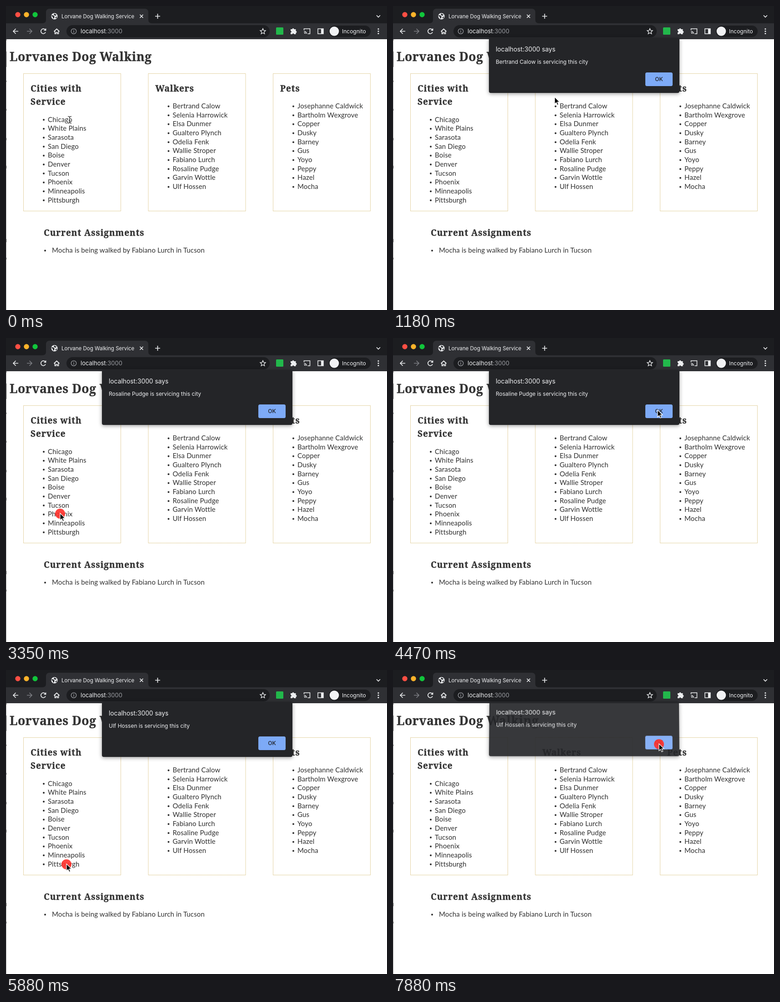
These frames come from a looping animation (838 by 668 pixels, 8 s). An HTML page:

```html
<!DOCTYPE html>
<html lang="en">
<head>
<meta charset="utf-8">
<title>Dog walking service</title>
<style>
html, body { margin: 0; width: 100%; height: 100%; overflow: hidden; background: #fff; }
svg { position: absolute; left: 0; top: 0; width: 838px; height: 668px; }
text { white-space: pre; }
.ui { font-family: Inter, Roboto, sans-serif; fill: #f1f2f4; }
.body { font: 15px Lato, "Open Sans", sans-serif; letter-spacing: .15px; fill: #2f2f2f; }
.head { font: 700 19px "Noto Serif", serif; letter-spacing: .95px; fill: #333; stroke: #333; stroke-width: .4; }
.icon { fill: none; stroke: #eceef0; stroke-width: 1.7; }
.solid { fill: #eceef0; }
#dialog { transform-origin: 420px 191px; filter: drop-shadow(0 2px 4px rgba(0, 0, 0, .4)); }
</style>
</head>
<body>
<svg id="page">
  <!-- window bar and tab -->
  <path fill="#1c1d20" d="M0 0H838V39H0z"/>
  <path fill="#2f3034" d="M0 38H80Q88 38 88 30V14Q88 6 96 6H305Q313 6 313 14V30Q313 38 321 38H838V73H0z"/>
  <circle cx="26" cy="19" r="5.700" fill="#ff4f44"/>
  <circle cx="45" cy="19" r="5.700" fill="#fdb32a"/>
  <circle cx="64" cy="19" r="5.700" fill="#11c63b"/>
  <circle cx="106.500" cy="22.500" r="7" class="solid"/>
  <path fill="#2f3034" d="M101 20l4 1 2 3-2 4-2-2v-2l-3-2zM106 16.500l5 2.500-1 2-3 0-2-2zM109 24l3-1-1 4-2 0z"/>
  <text class="ui" x="122" y="26.500" font-size="11.500">Lorvane Dog Walking Service</text>
  <path class="icon" d="M294.500 19l7 7m0-7l-7 7M328 22.500h11M333.500 17v11M815 20.500l4 4 4-4"/>
  <!-- toolbar -->
  <path class="icon" d="M27 55.500H16.500M21.500 50l-5.500 5.500 5.500 5.500"/>
  <path class="icon" style="stroke:#7b7d82" d="M46 55.500H56.500M51.500 50l5.500 5.500-5.500 5.500"/>
  <path class="icon" d="M86.500 52.500A5.300 5.300 0 1 0 87 57.500M87.500 49.500v4h-4M105.500 56l6-5.500 6 5.500M107.500 55v6h2.500v-3h3v3h2.500v-6"/>
  <rect x="133" y="42" width="447" height="27" rx="13.500" fill="#1c1d20"/>
  <circle cx="149" cy="55.500" r="5.700" fill="none" stroke="#9a9ca1" stroke-width="1.300"/>
  <path stroke="#9a9ca1" stroke-width="1.400" d="M149 54.800v3.700M149 52v1.400"/>
  <text class="ui" x="164" y="60" font-size="13">localhost<tspan fill="#9a9ca1">:3000</tspan></text>
  <path class="icon" style="stroke-width:1.300" d="M565 49.500l1.700 4.100 4.300.400-3.300 2.900 1 4.300-3.700-2.300-3.700 2.300 1-4.300-3.300-2.900 4.300-.400z"/>
  <rect x="594" y="47" width="16" height="16" rx="1.500" fill="#22b84b"/>
  <path class="solid" d="M626 51h3.500a2 2 0 1 1 4 0h4v4a2 2 0 1 1 0 4v3h-4a1.800 1.800 0 0 0-3.600 0H626v-3.800a1.800 1.800 0 0 0 0-3.600z"/>
  <path class="icon" style="stroke-width:1.500" d="M655.500 53v-3h13v11h-5M655.500 55.500a5.500 5.500 0 0 1 5.500 5.500M655.500 58.500a2.500 2.500 0 0 1 2.500 2.500M686 50h12v11h-12z"/>
  <path class="solid" d="M693 50h5v11h-5z"/>
  <rect x="710" y="43" width="92" height="25" rx="12.500" fill="#1c1d20"/>
  <circle cx="722" cy="55.500" r="10.300" fill="#f1f2f4"/>
  <text class="ui" x="739" y="60" font-size="12">Incognito</text>
  <g class="solid"><circle cx="819" cy="50.500" r="1.600"/><circle cx="819" cy="55.500" r="1.600"/><circle cx="819" cy="60.500" r="1.600"/></g>
  <!-- page -->
  <path stroke="#aaa" d="M.500 73V668"/>
  <path stroke="#333" d="M.500 73v3M.500 100v34M.500 164v3M.500 226v4M.500 290v5M.500 351v6M.500 512v7M.500 553v4"/>
  <text class="head" x="8" y="120.500" style="font-size:26.5px;letter-spacing:.6px">Lorvanes Dog Walking</text>
  <text class="head" x="83" y="505">Current Assignments</text>
</svg>
<svg id="dialog">
  <rect x="211" y="70" width="419" height="121" rx="4" fill="#242528"/>
  <text class="ui" x="226" y="99.500" font-size="13.800">localhost:3000 says</text>
  <text class="ui" id="message" x="226" y="126.500" font-size="12"></text>
  <rect x="555" y="146" width="60" height="30" rx="3.500" fill="#7daaf7"/>
  <text class="ui" x="585" y="165" font-size="12" font-weight="500" text-anchor="middle" style="fill:#1c1d20">OK</text>
</svg>
<svg id="pointer">
  <circle id="dot" fill="#ff302a"/>
  <path id="arrow" fill="#000" stroke="#fff" stroke-width="1.200" d="M0-1V14.500L3.600 11.200 6 16.800 8.600 15.700 6.200 10.200H11z"/>
  <g id="beam" fill="none">
    <path stroke="#fff" stroke-width="2.600" d="M-4-7.500Q0-7.500 0-5Q0-7.500 4-7.500M0-5V5M-4 7.500Q0 7.500 0 5Q0 7.500 4 7.500M-2 2.500H2"/>
    <path stroke="#111" stroke-width="1.200" d="M-4-7.500Q0-7.500 0-5Q0-7.500 4-7.500M0-5V5M-4 7.500Q0 7.500 0 5Q0 7.500 4 7.500M-2 2.500H2"/>
  </g>
</svg>
<script>
const $ = id => document.getElementById(id);
const clamp = v => Math.max(0, Math.min(1, v));
const LOOP = 8000;

const columns = [
  [["Cities with", "Service"], ["Chicago", "White Plains", "Sarasota", "San Diego", "Boise",
    "Denver", "Tucson", "Phoenix", "Minneapolis", "Pittsburgh"]],
  [["Walkers"], ["Bertrand Calow", "Selenia Harrowick", "Elsa Dunmer", "Gualtero Plynch", "Odelia Fenk",
    "Wallie Stroper", "Fabiano Lurch", "Rosaline Pudge", "Garvin Wottle", "Ulf Hossen"]],
  [["Pets"], ["Josephanne Caldwick", "Bartholm Wexgrove", "Copper", "Dusky", "Barney",
    "Gus", "Yoyo", "Peppy", "Hazel", "Mocha"]]
];

const label = (cls, x, y, s) => `<text class="${cls}" x="${x}" y="${y}">${s}</text>`;
const item = (dotX, textX, y, s) =>
  `<circle cx="${dotX}" cy="${y + .5}" r="2" fill="#2f2f2f"/>` + label("body", textX, y + 5, s);

let html = item(86, 101, 537, "Mocha is being walked by Fabiano Lurch in Tucson");
columns.forEach(([heads, items], c) => {
  const x = 38.5 + c * 274.5;
  html += `<rect x="${x}" y="148.5" width="214" height="302" fill="none" stroke="#c9a84c" stroke-dasharray="1 1"/>`;
  heads.forEach((s, i) => html += label("head", x + 15.5, 187.5 + i * 29.5, s));
  items.forEach((s, i) => html += item(x + 44.5, x + 53.5, 190.5 + heads.length * 29.5 + i * 19.67, s));
});
$("page").insertAdjacentHTML("beforeend", html);

// time, x, y
const path = [
  [0, 140, 250], [680, 140, 250], [1120, 308, 216], [1180, 355, 201], [1750, 585, 163], [1950, 585, 163],
  [2060, 367, 299], [2240, 367, 299], [2900, 119, 386], [3400, 119, 386], [3820, 420, 240],
  [4480, 582, 159], [4690, 582, 159], [4880, 397, 272], [5340, 133, 427], [6490, 133, 427],
  [7290, 563, 199], [7500, 585, 163], [LOOP, 585, 163]
];
// time, x, y of each press
const clicks = [
  [335, 140, 250], [1770, 585, 163], [2950, 119, 386],
  [4500, 582, 159], [5500, 133, 427], [7660, 585, 163]
];
// name, opening, closing, gone
const alerts = [
  ["Bertrand Calow", 480, 1950, 2060], ["Rosaline Pudge", 3090, 4705, 4885], ["Ulf Hossen", 5640, 7866, 8046]
];
const arrowTimes = [[600, 2240], [3200, 4790], [5740, LOOP]];

// slope at a waypoint; zero beside a pause
function slope(i, k) {
  const a = path[i - 1], p = path[i], b = path[i + 1];
  if (!a || !b || a[1] === p[1] || b[1] === p[1]) return 0;
  return (b[k] - a[k]) / (b[0] - a[0]);
}

function position(t) {
  const i = path.findIndex((p, n) => t < path[n + 1][0]);
  const a = path[i], b = path[i + 1], d = b[0] - a[0], u = clamp((t - a[0]) / d);
  const w = u * u * (3 - 2 * u);
  return [1, 2].map(k => a[k] + (b[k] - a[k]) * w
    + d * u * (1 - u) * ((1 - u) * slope(i, k) - u * slope(i + 1, k)));
}

function drawDialog(t) {
  const alert = alerts.find(a => t >= a[1] && t < a[3]);
  $("dialog").style.display = alert ? "" : "none";
  if (!alert) return;
  const [name, open, close, gone] = alert;
  const away = Math.max(1 - clamp((t - open) / 150), clamp((t - close) / (gone - close)));
  $("message").textContent = name + " is servicing this city";
  $("dialog").style.opacity = 1 - away;
  $("dialog").style.transform = `translateY(${-19 * away}px) perspective(300px) rotateX(${9 * away}deg)`;
}

function drawDot(t) {
  const click = clicks.find(c => t >= c[0] && t < c[0] + 660);
  $("dot").style.display = click ? "" : "none";
  if (!click) return;
  const age = t - click[0], grown = clamp(age / 170);
  $("dot").setAttribute("cx", click[1]);
  $("dot").setAttribute("cy", click[2]);
  $("dot").setAttribute("r", 25 - 14 * grown);
  $("dot").setAttribute("opacity", .9 * grown * (1 - clamp((age - 520) / 140)));
}

function frame(now) {
  const t = now % LOOP, [x, y] = position(t);
  const isArrow = arrowTimes.some(([a, b]) => t >= a && t < b);
  drawDialog(t);
  drawDot(t);
  for (const [id, on] of [["arrow", isArrow], ["beam", !isArrow]]) {
    $(id).style.display = on ? "" : "none";
    $(id).setAttribute("transform", `translate(${x} ${y})`);
  }
}

const start = performance.now();
function tick() {
  frame(performance.now() - start);
  requestAnimationFrame(tick);
}
tick();
</script>
</body>
</html>
```
